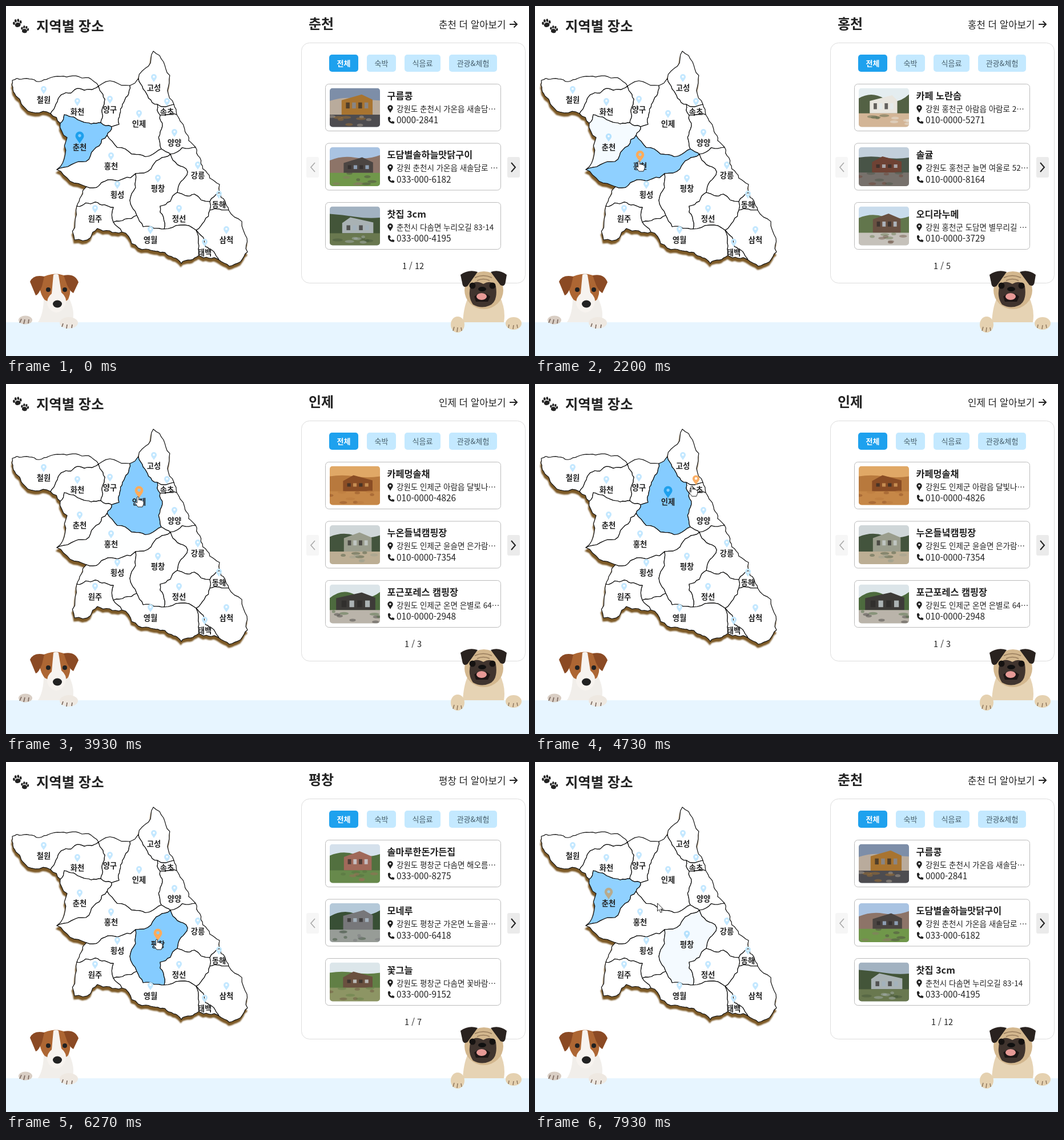
An HTML page that plays this animation: 916 by 612 pixels, repeating every 8 s.

```html
<!DOCTYPE html>
<html lang="ko">
<head>
<meta charset="utf-8">
<title>지역별 장소</title>
<style>
  html, body { margin: 0; width: 100%; height: 100%; overflow: hidden; background: #fff; }
  svg { display: block; width: 916px; height: 612px; font-family: 'Noto Sans CJK KR', 'Noto Sans CJK', 'Noto Sans', sans-serif; fill: #222; }
  #land { fill: #fff; stroke: #111; stroke-width: 1.2; stroke-linejoin: round; filter: drop-shadow(-.5px 6.5px 1px #7d5a27); }
  .bold { font-weight: 700; }
  .mid { text-anchor: middle; }
</style>
</head>
<body>
<svg viewBox="0 0 916 612">
  <defs>
    <clipPath id="frame"><rect width="88" height="68" rx="5"/></clipPath>
    <path id="pin" fill-rule="evenodd" d="M0 7C-1.5 4-5 1-5-2A5 5 0 0 1 5-2C5 1 1.5 4 0 7ZM0-4a1.8 1.8 0 1 0 .01 0Z"/>
    <path id="phone" d="M-5-5l3-1 2 4-2 1.500q1 2.500 3.500 3.500L3 1.500l3.500 1.800-1 3Q-6 6-5-5Z"/>
    <g id="paw">
      <ellipse cy="3" rx="5" ry="4"/>
      <ellipse cx="-6" cy="-1" rx="1.900" ry="2.700"/><ellipse cx="-2.300" cy="-4.500" rx="1.900" ry="2.800"/>
      <ellipse cx="2.300" cy="-4.500" rx="1.900" ry="2.800"/><ellipse cx="6" cy="-1" rx="1.900" ry="2.700"/>
    </g>
  </defs>

  <rect y="553" width="916" height="59" fill="#e7f5ff"/>
  <use href="#paw" transform="translate(20 30) rotate(-12)"/>
  <use href="#paw" transform="translate(33 41) rotate(12) scale(.9)"/>
  <text class="bold" x="53" y="44" font-size="24.300">지역별 장소</text>

  <g id="land"></g>
  <g id="marks"></g>

  <rect x="517.500" y="64.500" width="392" height="420" rx="14" fill="#fff" stroke="#ddd"/>
  <g id="tabs"></g>
  <rect x="526" y="264" width="22" height="36" rx="3" fill="#f6f6f6"/>
  <path d="M541 274l-7 8 7 8" fill="none" stroke="#aaa" stroke-width="1.600"/>
  <rect x="878" y="264" width="22" height="36" rx="3" fill="#ebebeb"/>
  <path d="M885 274l7 8-7 8" fill="none" stroke="#222" stroke-width="2"/>
  <path d="M882 32h13m-5.500-5.500l5.500 5.500-5.500 5.500" fill="none" stroke="#222" stroke-width="2"/>
  <g id="panel"></g>

  <g id="terrier">
    <path fill="#f1eeea" d="M56 553Q66 538 66 510H110Q122 534 116 553Z"/>
    <path fill="#ad6633" d="M60 476Q86 462 108 474Q117 500 108 514Q90 526 68 514Q56 500 60 476Z"/>
    <path fill="#8b4a24" d="M42 482Q48 469 67 473L63 490Q57 505 52 506ZM127 483Q121 467 101 471L107 488Q113 500 118 502Z"/>
    <path fill="#f7f3ef" d="M83 470Q88 467 92 470L97 501Q108 510 104 522Q100 535 88 536Q74 533 72 520Q72 509 80 503Z"/>
    <circle cx="74" cy="496" r="4"/><circle cx="103" cy="496" r="4"/>
    <ellipse cx="90" cy="521" rx="8" ry="6.500"/>
    <ellipse cx="34" cy="549" rx="12" ry="7.500" fill="#d9cec4"/>
    <ellipse cx="110" cy="554" rx="16" ry="10" fill="#eee8e1"/>
    <path d="M24 554l3-7m4 9l2-8m6 7l1-7M98 561l2-6m6 9l1-7m8 6l1-6" stroke="#7d6a60" stroke-width="1.700"/>
  </g>
  <g id="pug">
    <path fill="#e6d3b4" d="M800 553Q802 520 812 506H864Q876 530 872 553Z"/>
    <ellipse cx="837" cy="497" rx="34" ry="33" fill="#d3b78e"/>
    <path fill="#29221f" d="M796 470Q810 460 826 465L808 490Q800 494 799 484ZM877 470Q864 460 849 465L866 488Q874 492 875 482Z"/>
    <path fill="#40342e" d="M814 488Q822 478 836 486Q850 478 858 490Q862 518 846 524Q832 530 818 522Q808 508 814 488Z"/>
    <path d="M821 475q15-7 30 0m-26 5q11-5 22 0" fill="none" stroke="#94795a" stroke-width="1.500"/>
    <circle cx="817" cy="489" r="5.500" fill="#151211"/><circle cx="852" cy="489" r="5.500" fill="#151211"/>
    <ellipse cx="834" cy="495" rx="7" ry="4" fill="#111"/>
    <path fill="#1e1716" d="M820 508Q834 496 848 508L844 517H823Z"/>
    <ellipse cx="833" cy="508" rx="9" ry="6" fill="#e79a96"/>
    <ellipse cx="791" cy="557" rx="12" ry="14" fill="#e5d1b0"/><ellipse cx="889" cy="555" rx="14" ry="11" fill="#e5d1b0"/>
    <path d="M783 568l2-7m5 9l1-8m7 6l-1-6M880 563l1-6m7 8l1-7m7 5l-1-6" stroke="#8d765d" stroke-width="1.500"/>
  </g>

  <g id="cursor" fill="#fff" stroke="#222" stroke-linejoin="round">
    <path id="arrow" d="M0 0V14L3.200 11 5.500 16.500 8 15.400 5.700 10.200H10Z"/>
    <path id="hand" d="M-1.500 9V1Q0-1 1.500 1V6Q4 4.500 5 6.500Q7 5.500 8 7.500Q10 7 10 9V13L8 18H0L-5 11Q-5 8-1.500 11Z"/>
  </g>
</svg>

<script>
const $ = id => document.getElementById(id);
const LIGHT = [196, 232, 255], BLUE = [30, 160, 237], ORANGE = [255, 171, 90];
const WHITE = [255, 255, 255], SKY = [133, 204, 255];
const FADE = 300, LOOP = 8000, STEP = 1000 / 15;

const clamp = v => Math.max(0, Math.min(1, v));
const ease = v => 1 - (1 - clamp(v)) ** 2.1;
const smooth = v => clamp(v) ** 2 * (3 - 2 * clamp(v));
const lerp = (a, b, p) => a + (b - a) * p;
const mix = (a, b, p) => a.map((v, i) => lerp(v, b[i], p));
const rgb = c => `rgb(${c.map(Math.round)})`;
const noise = (x, y) => { const n = Math.sin(x * 12.9898 + y * 78.233) * 43758.5453; return n - Math.floor(n); };

// Corners where borders bend or meet; the wiggle between them is generated.
const corners = {
  a: [11, 130], b: [79, 125], c: [162, 140], d: [217, 139], e: [232, 127], f: [258, 79], g: [294, 172], h: [299, 190],
  i: [332, 247], j: [374, 312], k: [374, 326], l: [390, 357], m: [422, 406], n: [423, 430], o: [391, 455], p: [373, 444],
  q: [338, 436], r: [307, 450], s: [245, 425], t: [203, 395], u: [160, 389], v: [148, 405], w: [120, 409], x: [124, 350],
  y: [141, 316], z: [89, 286], A: [107, 230], B: [95, 205], C: [78, 188], D: [29, 174], E: [12, 146],
  F: [97, 155], G: [102, 190], H: [166, 204], I: [185, 211], J: [198, 207], K: [204, 172], L: [177, 226], M: [148, 262],
  N: [140, 272], O: [240, 145], P: [265, 172], Q: [270, 191], R: [272, 250], S: [274, 210], T: [252, 262], U: [220, 259],
  V: [288, 259], W: [318, 290], X: [300, 326], Y: [254, 285], Z: [227, 293], 0: [217, 340], 1: [270, 350], 2: [277, 390],
  3: [240, 386], 4: [229, 366], 5: [188, 352], 6: [188, 378], 7: [357, 342], 8: [357, 357], 9: [333, 392]
};

// Label centre and the corners around each region.
const cities = {
  철원: [66, 164, 'abcFCDE'], 화천: [125, 185, 'cHGBCF'], 양구: [182, 181, 'cdKJIH'], 고성: [259, 143, 'efgPO'],
  속초: [282, 185, 'PghQ'], 인제: [233, 206, 'eOPQSRTULIJKd'], 춘천: [129, 247, 'BGHILMNzA'], 양양: [295, 239, 'QhiVRS'],
  홍천: [184, 280, 'LUTRVYZyzNM'], 강릉: [336, 296, 'Vijk7XW'], 횡성: [195, 330, 'yZ0465x'], 평창: [266, 319, 'VWX12340ZY'],
  동해: [373, 347, '7kl8'], 원주: [156, 372, 'x56tuvw'], 정선: [303, 372, 'X78921'], 영월: [253, 409, '64329qrst'],
  삼척: [386, 409, '8lmnop9'], 태백: [348, 431, '9pq']
};

function wiggle([x1, y1], [x2, y2]) {
  const dx = x2 - x1, dy = y2 - y1;
  if (Math.hypot(dx, dy) < 8) return [[x1, y1]];
  const bend = (noise(x1 + x2, y1 + y2) - .5) * .3;
  const middle = [(x1 + x2) / 2 - dy * bend, (y1 + y2) / 2 + dx * bend];
  return [...wiggle([x1, y1], middle), ...wiggle(middle, [x2, y2])];
}

// Neighbours share an edge, so it is always generated in the same direction.
function edge(from, to) {
  if (from < to) return wiggle(corners[from], corners[to]);
  return [...wiggle(corners[to], corners[from]).slice(1), corners[to]].length
    ? [corners[from], ...wiggle(corners[to], corners[from]).slice(1).reverse()] : [];
}

const outline = keys => 'M' + [...keys].flatMap((key, i) => edge(key, keys[(i + 1) % keys.length])).join('L') + 'Z';

// Each place: name, address, phone, colours of sky, background, building and ground.
const places = {
  춘천: [12,
    ['구름콩', '강원도 춘천시 가온읍 새솔담…', '0000-2841', '#7d8ea8 #b9ab9c #a87430 #4d4c50'],
    ['도담별솔하늘맛닭구이', '강원 춘천시 가온읍 새솔담로 …', '033-000-6182', '#a9c3e2 #8d7468 #4b4542 #70974a'],
    ['찻집 3cm', '춘천시 다솜면 누리오길 83-14', '033-000-4195', '#a2b2c1 #435539 #a9b2b4 #69784f']],
  홍천: [5,
    ['카페 노란솜', '강원 홍천군 아람읍 아람로 2…', '010-0000-5271', '#e4edf0 #536144 #e9e6df #d3b596'],
    ['솔귤', '강원도 홍천군 늘면 여울로 52…', '010-0000-8164', '#c2cfdb #485447 #6e4234 #77716c'],
    ['오디라누메', '강원 홍천군 도담면 별무리길 …', '010-0000-3729', '#c9dcec #62764c #695142 #c5c1ba']],
  인제: [3,
    ['카페멍솔채', '강원도 인제군 아람읍 달빛나…', '010-0000-4826', '#e0a866 #b8793d #8a4d25 #c68747'],
    ['누온들녘캠핑장', '강원도 인제군 윤슬면 은가람…', '010-0000-7354', '#cfd6d8 #43543d #9a9d8d #bcae94'],
    ['포근포레스 캠핑장', '강원도 인제군 온면 은별로 64…', '010-0000-2948', '#dce5e9 #4d6b3e #3d3b38 #bab4aa']],
  속초: [6,
    ['물보라할매만두', '강원 속초시 은솔로381번길 72', '033-000-5962', '#c3d3df #a5968a #8a6b58 #b6afa9'],
    ['도도 Pup', '강원도 속초시 나래로 619-4…', '010-0000-6397', '#78addd #446b3c #505a64 #a99f8d'],
    ['52MEADOW', '강원도 속초시 달그늘로 84', '033-000-7146', '#789fbf #5d7070 #d3ccc0 #3a4040']],
  평창: [7,
    ['솔마루한돈가든집', '강원도 평창군 다솜면 해오름…', '033-000-8275', '#d5e1ec #52703f #a0695a #67894b'],
    ['모네루', '강원도 평창군 가온면 노을골…', '033-000-6418', '#b5c9d9 #384f35 #77777a #979c97'],
    ['꽃그늘', '강원도 평창군 다솜면 꽃바람…', '033-000-9152', '#dce6ea #617f45 #6a503f #8d9564']]
};

const visits = [
  { city: '홍천', arrive: 1670, click: 1990, leave: 2470 },
  { city: '인제', arrive: 3200, click: 3660, leave: 4200 },
  { city: '속초', arrive: 4870, click: 5000, leave: 5350 },
  { city: '평창', arrive: 5870, click: 5925, leave: 6700 },
  { city: '춘천', arrive: 7450, click: 7730, leave: 7880 }
];
const hoverStart = visit => visit.arrive - 350;
const spot = ({ city }) => [cities[city][0] - 2, cities[city][1] - 9];
const stops = [{ at: [300, 615], leave: 860 },
  ...visits.map(v => ({ ...v, at: spot(v) })), { at: [245, 250], arrive: 7960 }];

for (const [name, [x, y, keys]] of Object.entries(cities)) {
  $('land').innerHTML += `<path id="region-${name}" d="${outline(keys)}"/>`;
  $('marks').innerHTML += `<text class="bold mid" x="${x}" y="${y + 4.5}" font-size="13.300">${name}</text>
    <use href="#pin" id="pin-${name}"/>`;
}

let tabX = 566;
for (const [label, width] of [['전체', 51], ['숙박', 51], ['식음료', 63], ['관광&amp;체험', 84]]) {
  const active = label === '전체';
  $('tabs').innerHTML += `<rect x="${tabX}" y="85" width="${width}" height="30" rx="5" fill="${active ? '#1ea1ee' : '#c4e9ff'}"/>
    <text class="mid ${active ? 'bold' : ''}" x="${tabX + width / 2}" y="104.500" font-size="13" fill="${active ? '#fff' : '#48606d'}">${label}</text>`;
  tabX += width + 15;
}

// A small landscape: treeline, house with windows, ground and bushes.
function scene(colours, seed) {
  const [sky, back, house, ground] = colours.split(' ');
  const random = (i, low, high) => lerp(low, high, noise(seed, i));
  const left = random(1, 8, 26), right = random(2, 66, 84), top = random(3, 16, 24), floor = random(4, 42, 47);
  const window = (right - left) / 5;
  let art = `<rect width="88" height="68" fill="${sky}"/>
    <path fill="${back}" d="M0 ${random(5, 8, 24)}Q22 ${random(6, 2, 16)} 44 18T88 ${random(7, 10, 22)}V50H0Z"/>
    <path fill="${house}" d="M${left} ${top + 5}L${random(8, 36, 60)} ${top - 5} ${right} ${top + 4}V${floor}H${left}Z"/>
    <rect y="${floor}" width="88" height="30" fill="${ground}"/>`;
  for (let i = 0; i < 4; i++) {
    art += `<rect x="${left + (i + .7) * window}" y="${top + 9}" width="${window * .6}" height="${random(9, 6, 12)}" fill="${i % 2 ? sky : '#2d2a28'}" opacity=".7"/>`;
  }
  for (let i = 0; i < 9; i++) {
    art += `<ellipse cx="${random(20 + i, 0, 88)}" cy="${random(40 + i, floor, 66)}" rx="${random(60 + i, 3, 9)}" ry="2.500" fill="${i % 2 ? back : house}" opacity=".45"/>`;
  }
  return art;
}

const card = ([name, address, phone, colours], i) => `<g transform="translate(559.5 ${136.5 + i * 103.5})">
  <rect width="307" height="82" rx="6" fill="#fff" stroke="#bbb"/>
  <g transform="translate(7.5 7)" clip-path="url(#frame)">${scene(colours, name.length + address.length + i)}</g>
  <text class="bold" x="108" y="26" font-size="16.300">${name}</text>
  <use href="#pin" transform="translate(113.5 43.5) scale(.95)"/><text x="124.500" y="48" font-size="13.500">${address}</text>
  <use href="#phone" x="114.500" y="63"/><text x="124.500" y="68.500" font-size="15.300">${phone}</text></g>`;

function showPanel(city) {
  const [pages, ...list] = places[city];
  $('panel').innerHTML = `<text class="bold" x="530" y="40" font-size="24">${city}</text>
    <text x="758" y="38.500" font-size="16.800">${city} 더 알아보기</text>
    <text class="mid" x="713" y="459.500" font-size="14.500">1 / ${pages}</text>` + list.map(card).join('');
}

function moveCursor(t) {
  const next = stops.findIndex(stop => t < stop.arrive);
  const from = stops.at(next - 1), to = stops.at(next);
  const [x, y] = mix(from.at, to.at, smooth((t - from.leave) / (to.arrive - from.leave)));
  const pointing = visits.some(v => t >= hoverStart(v) && t < v.leave);
  $('cursor').style.display = t < stops[0].leave ? 'none' : '';
  $('cursor').setAttribute('transform', `translate(${x} ${y})`);
  $('hand').style.display = pointing ? '' : 'none';
  $('arrow').style.display = pointing ? 'none' : '';
}

let shown;
function draw(t) {
  const history = [{ city: '춘천', click: -LOOP }, ...visits.filter(v => v.click <= t)];
  const current = history.at(-1), previous = history.at(-2);
  const progress = ease((t - current.click) / FADE);
  if (shown !== current.city) showPanel(shown = current.city);

  for (const [name, [x, y]] of Object.entries(cities)) {
    const selected = name === current.city ? progress : name === previous?.city ? 1 - progress : 0;
    const visit = visits.find(v => v.city === name);
    const hovered = visit ? ease((t - hoverStart(visit)) / FADE) * (1 - ease((t - visit.leave) / FADE)) : 0;
    const scale = Math.max(1 + selected * .5, 1 + hovered * .25);
    $('pin-' + name).setAttribute('transform', `translate(${x} ${y - 17}) scale(${scale})`);
    $('pin-' + name).style.fill = rgb(mix(mix(LIGHT, BLUE, selected), ORANGE, hovered));
    $('region-' + name).style.fill = rgb(mix(WHITE, SKY, selected));
  }
  moveCursor(t);
}

const begin = performance.now();
function tick() {
  const t = (performance.now() - begin) % LOOP;
  draw(Math.floor((t + 5) / STEP) * STEP % LOOP);
  requestAnimationFrame(tick);
}
tick();
</script>
</body>
</html>
```
